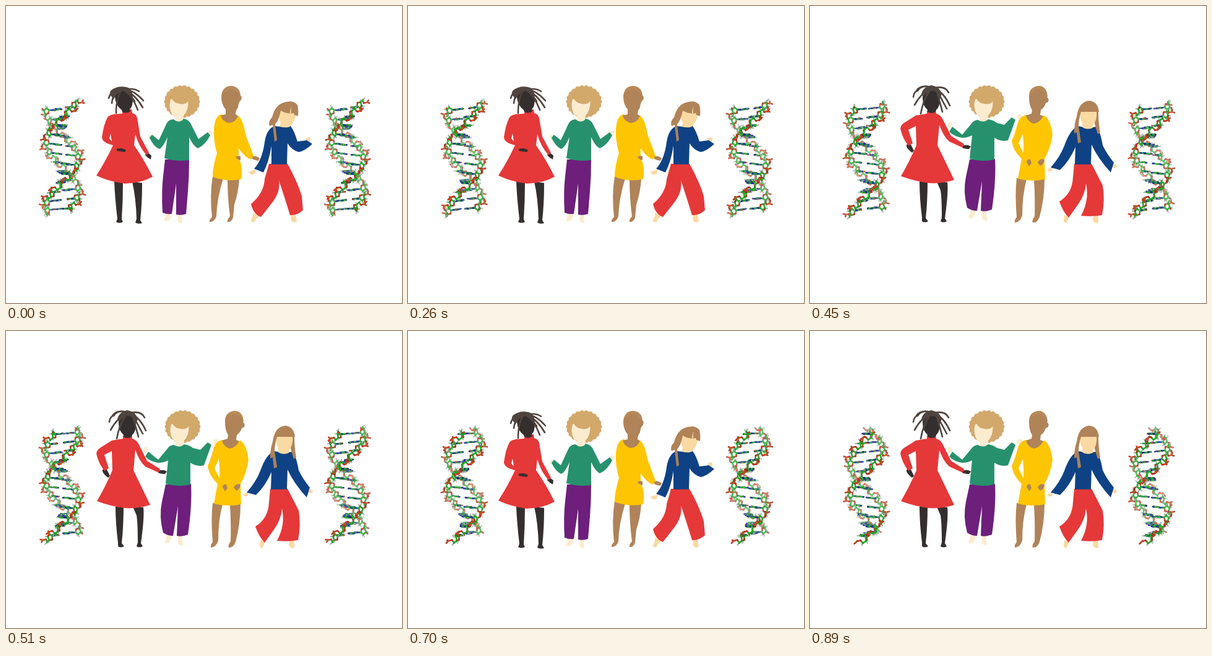
Recreate the animation shown at these times as an HTML page with a canvas. Size 640 by 480 pixels, loop 1.02 s.

```html
<!DOCTYPE html>
<html lang="en">
<head>
<meta charset="utf-8">
<title>Dancing friends</title>
<style>
html, body { margin: 0; width: 100%; height: 100%; overflow: hidden; background: #fff; }
canvas { display: block; width: 100vw; height: 100vh; }
</style>
</head>
<body>
<canvas id="stage" width="640" height="480"></canvas>
<script>
const stage = document.getElementById('stage');
const ctx = stage.getContext('2d');
const LOOP = 1020;
const STARTS = [0, 130, 260, 320, 450, 510, 640, 700, 830, 890];

/* ---- dancers: [colour, path, stroke width if it is a line] ---- */
const RED = '#e53839', GREEN = '#27916d', PURPLE = '#6d1f7b', YELLOW = '#fec503',
  NAVY = '#0f4284', DARK = '#342f2e', LOCKS = '#50443e', BROWN = '#b08358',
  CROP = '#b98a58', CURLS = '#d2a86b', CREAM = '#fbebcf', PEACH = '#fad9a2', WHITE = '#fff';

const blob = (x, y, rx, ry) =>
  `M${x - rx} ${y}a${rx} ${ry} 0 1 0 ${2 * rx} 0a${rx} ${ry} 0 1 0 ${-2 * rx} 0Z`;

function curls(x, y) {
  let d = blob(x, y, 25, 22.5);
  for (let i = 0; i < 22; i++) {
    const a = i * Math.PI / 11;
    d += blob(x + 24.5 * Math.cos(a), y + 22 * Math.sin(a), 4.4, 4.4);
  }
  return d;
}

const curlyHead = x => [
  [CURLS, curls(x + 284.5, 154.5)],
  [CREAM, `M${x + 266} 151Q${x + 263} 161 ${x + 266} 170Q${x + 268} 176 ${x + 273} 178L${x + 273} 185Q${x + 280} 189 ${x + 286} 184L${x + 287} 177Q${x + 295} 169 ${x + 294.5} 154Q${x + 289} 160 ${x + 281} 158Q${x + 272} 157 ${x + 268} 150Z`]
];

const poseA = [
  [DARK, 'M175 284L189 284Q189 315 187 345L189 349Q183 352 178 349L180 344Q176 310 175 284ZM204 284L220 286Q220 320 217 346L220 351Q213 353 209 350L211 344Q210 310 204 284Z'],
  [DARK, 'M226 238Q230 236 235 242L234 248Q228 245 225 241Z'],
  [RED, 'M188 168L203 167L204 173Q211 175 212 181L217 211L231 237L227 241Q214 226 209 207L207 225Q223 248 237 276Q216 287 192 287Q167 284 146 274Q161 251 173 225L166 223Q155 219 155 212Q158 191 164 180Q168 174 188 174Z'],
  [WHITE, 'M169 206L167 214L171 219Z'],
  [DARK, 'M179 231Q188 228 194 233L192 236Q184 235 179 234Z'],
  [DARK, 'M176 147Q176 133 191 133Q205 133 205 149Q205 163 200 167L201 170Q195 175 188 171L187 168Q177 161 176 147Z'],
  [LOCKS, 'M171 147Q165 142 170 136Q181 128 194 131Q202 132 204 142Q192 135 184 139Q177 143 174 151Z'],
  [LOCKS, 'M185 133Q171 133 166 149M187 134Q173 139 171 157M187 136Q178 147 178 173M190 135Q207 132 215 138M192 135Q207 136 222 153M191 135Q209 143 221 164M193 136Q205 147 213 168M192 137Q203 145 208 154', 2.6],

  [CREAM, 'M257 334L266 335L266 342L263 347Q257 349 255 345L258 341ZM278 335L286 335L284 343L286 350Q279 352 277 346Z'],
  [PURPLE, 'M257 248L296 248Q296 275 294 300L291 336Q283 339 275 337L275 287L268 336Q260 337 253 334Q251 300 254 275Z'],
  [CREAM, blob(233, 212, 3, 4) + blob(330, 205, 3.4, 4)],
  [GREEN, 'M270 183Q279 188 287 182Q296 184 299 191L311 215L326 204L330 209Q322 225 310 230Q303 227 296 212L296 249Q275 252 256 246L261 212Q254 228 248 231Q239 228 232 213L236 208L247 217L259 191Q262 184 270 183Z'],
  ...curlyHead(0),

  [BROWN, 'M334 275L351 279Q341 310 340 340Q337 349 329 349Q328 346 333 341Q329 306 334 275ZM358 280L377 278Q376 300 369 321L367 342Q364 350 358 349Q357 345 362 340Q358 310 358 280Z'],
  [BROWN, 'M397 244Q402 240 410 246L408 250Q400 249 397 246Z'],
  [YELLOW, 'M348 175Q362 181 375 177Q383 183 387 207L400 242L396 248Q386 245 376 230L376 245Q384 261 380 280Q357 285 334 276Q334 260 341 238Q335 217 336 200Q337 178 348 175Z'],
  [BROWN, 'M371 244Q376 241 379 243L379 249Q374 249 371 244Z'],
  [BROWN, 'M348 146Q349 130 364 130Q378 130 379 145Q382 146 380 152Q376 154 375 164Q371 169 371 175L375 178Q370 189 360 189Q350 187 347 177L355 175L355 167Q348 160 348 146Z'],
  [CROP, 'M349 144Q350 130 363 129Q376 129 378 144Q368 132 359 136Q352 137 349 144Z'],

  [PEACH, 'M399 334L410 339Q402 345 402 349Q395 350 396 346Q400 340 399 334ZM460 336L468 336L470 348Q465 352 461 347ZM404 264L402 271Q395 275 392 268ZM484 215Q490 210 492 214L491 220L485 221Z'],
  [RED, 'M425 255L455 255Q471 284 478 307L480 330Q470 339 459 338Q450 308 441 282Q444 300 430 318L412 341Q400 337 396 320Q417 302 418 280Z'],
  [NAVY, 'M434 194Q449 196 460 194Q466 202 471 219L486 217L495 223Q482 235 473 236Q462 233 455 222L454 256L429 256L429 226Q425 252 416 269L401 263Q414 249 418 220Q421 199 434 194Z'],
  [PEACH, 'M441 168L468 169Q470 183 460 194Q455 198 442 195L444 189Q439 178 441 168Z'],
  [BROWN, 'M426 194Q423 187 430 180Q435 160 449 156Q464 151 471 160Q473 168 472 178L466 176L465 173Q454 175 444 169Q441 185 435 191L438 217L434 219L431 192Z'],
  [PEACH, 'M462 162Q460 166 461 173L459 173Q459 166 462 162Z']
];

const poseB = [
  [DARK, 'M177 284L190 284Q190 315 187 343L191 348Q185 351 181 348L181 342Q177 310 177 284ZM205 284L222 285Q224 300 218 343L221 348Q215 351 211 348L213 342Q213 310 211 298Z'],
  [DARK, 'M156 224L162 222L168 234L165 237Q158 232 156 227ZM246 226Q254 223 260 227L257 231Q250 231 246 229Z'],
  [RED, 'M189 169L203 168L204 174Q211 176 214 182L228 210L249 223L247 229L225 219Q215 210 209 192L206 225Q218 250 233 281Q213 288 190 286Q169 283 147 275Q161 251 172 225L171 194L159 200L166 222L159 226Q149 213 146 198Q147 192 152 189L171 177L189 174Z'],
  [DARK, 'M182 149Q182 134 197 135Q210 136 210 150Q210 163 204 168L203 171Q197 175 190 171L190 168Q182 161 182 149Z'],
  [LOCKS, 'M180 143Q182 131 196 128Q209 130 213 142L210 150Q207 138 198 137Q189 138 183 147Z'],
  [LOCKS, 'M194 131Q180 127 174 137Q168 138 167 147M195 134Q180 140 169 160M194 136Q183 151 179 174M189 130Q177 129 172 137M202 132Q219 129 224 140M203 134Q217 141 226 161M204 135Q212 149 221 166M205 139Q209 152 214 171', 2.6],

  [CREAM, 'M259 328L268 330L266 338L264 342Q259 345 256 341L259 336ZM278 330L286 330L284 338L287 345Q282 349 278 343Z'],
  [PURPLE, 'M258 248L299 247Q301 281 294 329Q284 333 276 331L278 283L270 331Q261 331 254 326Q247 300 252 276Z'],
  [CREAM, blob(226, 192, 3.5, 5) + blob(339, 179, 4.5, 4.5)],
  [GREEN, 'M271 184Q280 189 287 183Q296 184 302 189L314 192L326 180L332 184L320 217Q309 220 298 213L298 248Q278 253 258 247L262 209Q255 213 246 213Q233 211 225 203L230 195L246 208L261 190Q264 185 271 184Z'],
  ...curlyHead(1),

  [BROWN, 'M334 278L350 280Q343 306 343 339Q339 350 331 350Q330 346 334 341Q331 304 334 278ZM362 281L379 279Q379 311 371 341Q367 351 360 350Q358 347 363 340Q364 312 362 281Z'],
  [YELLOW, 'M349 176Q368 183 379 177Q389 184 392 208Q389 230 379 247L380 280Q357 285 336 279L342 247Q328 234 326 218Q332 205 336 188Q340 178 349 176Z'],
  [WHITE, 'M344 207L337 222L345 238Q346 223 344 207Z'],
  [BROWN, 'M350 252Q351 247 356 248L358 254L354 259ZM368 253Q371 246 379 248Q378 256 372 258Z'],
  [BROWN, 'M354 147Q354 130 369 130Q384 131 383 148Q387 149 385 155L381 157Q379 164 373 168L372 176L377 178Q371 189 361 190Q352 187 349 177L358 174L359 168Q354 161 354 147Z'],
  [CROP, 'M356 144Q357 129 371 129Q384 131 384 149Q380 136 370 134Q361 135 356 144Z'],

  [PEACH, 'M411 338L419 340L415 350Q411 352 410 347ZM458 338L466 338L466 350Q461 353 457 346ZM392 260L391 266Q386 270 383 264ZM487 259Q492 253 496 258Q496 263 490 262Z'],
  [RED, 'M427 255L455 255Q465 274 473 290Q477 313 472 338Q456 341 438 339Q452 313 446 287Q445 304 433 321L418 342Q409 333 403 316Q424 303 425 277Z'],
  [NAVY, 'M433 194Q449 198 463 195Q469 202 473 225Q479 238 491 253L486 269Q465 246 455 224L454 256L428 256L429 228Q419 251 404 265L389 261Q404 244 411 226Q420 200 433 194Z'],
  [BROWN, 'M460 170L466 170Q466 188 469 204L465 207L460 190Z'],
  [PEACH, 'M437 168L463 169Q465 184 457 193L457 197Q448 201 440 196L440 189Q435 181 437 168Z'],
  [BROWN, 'M427 206Q427 190 431 179Q434 155 451 153Q465 154 467 171L438 171Q434 185 434 194L438 220L433 222L431 204Z']
];

function drawDancers(pose) {
  ctx.lineCap = 'round';
  for (const [colour, d, width] of pose) {
    const path = new Path2D(d);
    if (width) {
      ctx.strokeStyle = colour;
      ctx.lineWidth = width;
      ctx.stroke(path);
    } else {
      ctx.fillStyle = colour;
      ctx.fill(path);
    }
  }
}

/* ---- double helix: stick model, cylindrical atoms [element, r, angle, z] ---- */
const RAD = Math.PI / 180;
const SUGAR = [
  ['P', 8.9, 95.2, 2.1], ['O', 10.2, 91, 1.8], ['O', 9.3, 102, 3], ['O', 7.7, 88, 1.8],
  ['C', 7.7, 79.8, 2.8], ['C', 7.6, 69.9, 2], ['O', 6.2, 66, 1.8], ['C', 8.2, 69.9, .6],
  ['C', 7, 73.2, -.2], ['C', 5.9, 67.4, .5], ['O', 8.9, 62.5, .1],
  ['H', 8.6, 82, 3.5], ['H', 8.3, 65, 2.7], ['H', 9.1, 74, .5], ['H', 6.8, 80, -.8], ['H', 7.4, 70, -1.1]
];
const SUGAR_BONDS = '0-1 0-2 0-3 3-4 4-5 5-6 5-7 7-8 8-9 9-6 7-10 4-11 5-12 7-13 8-14 8-15';
// Flat base rings: elements, x, y, bonds.
const PURINE = {
  el: 'NCNCCNNCNC',
  x: [-1.3, 0, .9, .1, .4, 1.6, -.7, -1.9, -2.3, -1.3],
  y: [4.5, 4.9, 3.9, 2.8, 1.4, .9, .5, 1, 2.3, 3.1],
  bonds: '0-1 1-2 2-3 3-4 4-5 4-6 6-7 7-8 8-9 9-0 9-3'
};
const PYRIMIDINE = {
  el: 'NCONCNCHC',
  x: [-1.3, -1.5, -2.6, -.3, 1, 1.9, 1.1, 2.3, 0],
  y: [4.5, 3.1, 2.6, 2.4, 2.9, 2.1, 4.3, 4.9, 5.1],
  bonds: '0-1 1-2 1-3 3-4 4-5 4-6 6-7 6-8 8-0'
};
const SEQ = 'CGCGAATTCGCG';
const TILT = .1;
const INK = { C: [36, 208, 44], O: [232, 58, 36], P: [236, 116, 24], N: [32, 32, 200], H: [218, 218, 218] };
const pairs = text => text.split(' ').map(p => p.split('-').map(Number));

function nucleotide(i, side, turn) {
  const ring = 'GA'.includes(SEQ[i]) === (side > 0) ? PURINE : PYRIMIDINE;
  const flat = [...ring.el].map((el, n) =>
    [el, Math.hypot(ring.x[n], ring.y[n]), Math.atan2(ring.y[n], -ring.x[n]) / RAD, ring.y[n] * TILT]);
  const atoms = SUGAR.concat(flat).map(([el, r, angle, z]) => {
    const a = (side * angle - 34.3 * i + turn) * RAD;
    const depth = -r * Math.sin(a) * 3.65;
    const zoom = 1 + depth * .0012;
    const y = 166 + 14.7 * i - side * z * 4.35;
    return { el, depth, x: r * Math.cos(a) * 3.65 * zoom, y: 247 + (y - 247) * zoom };
  });
  const base = SUGAR.length;
  const bonds = pairs(SUGAR_BONDS).concat([[9, base]],
    pairs(ring.bonds).map(([a, b]) => [a + base, b + base]));
  return { atoms, bonds };
}

function buildBonds(turn) {
  const out = [];
  for (const side of [1, -1]) {
    const strand = [...SEQ].map((_, i) => nucleotide(i, side, turn));
    strand.forEach(({ atoms, bonds }, i) => {
      for (const [a, b] of bonds) out.push([atoms[a], atoms[b]]);
      const next = strand[i + side];
      if (next) out.push([atoms[10], next.atoms[0]]);
    });
  }
  return out.sort((p, q) => p[0].depth + p[1].depth - q[0].depth - q[1].depth);
}

function tint(el, depth, shade) {
  const fog = Math.min(1, Math.max(0, (20 - depth) / 56)) * .42;
  return `rgb(${INK[el].map(c => Math.round(c * shade * (1 - fog) + 255 * fog))})`;
}

function line(x1, y1, x2, y2, colour, width) {
  ctx.strokeStyle = colour;
  ctx.lineWidth = width;
  ctx.beginPath();
  ctx.moveTo(x1, y1);
  ctx.lineTo(x2, y2);
  ctx.stroke();
}

function drawHelix(cx, bonds) {
  ctx.save();
  ctx.translate(cx, 0);
  ctx.lineCap = 'round';
  for (const [a, b] of bonds) {
    const mx = (a.x + b.x) / 2, my = (a.y + b.y) / 2;
    const thin = a.el === 'H' || b.el === 'H' ? .75 : 1;
    for (const [shade, width] of [[.45, 2.4], [1, 1.5]]) {
      line(a.x, a.y, mx, my, tint(a.el, a.depth, shade), width * thin);
      line(mx, my, b.x, b.y, tint(b.el, b.depth, shade), width * thin);
    }
  }
  ctx.restore();
}

/* ---- playback ---- */
function draw(step) {
  ctx.fillStyle = WHITE;
  ctx.fillRect(0, 0, 640, 480);
  const bonds = buildBonds(-112 + 12 * step);
  drawHelix(91, bonds);
  drawHelix(552, bonds);
  drawDancers(Math.floor(step / 3) % 2 ? poseB : poseA);
}

const begin = performance.now();
let shown = -1;
function tick() {
  const t = (performance.now() - begin) % LOOP;
  const step = STARTS.filter(s => s <= t).length - 1;
  if (step !== shown) draw(shown = step);
  requestAnimationFrame(tick);
}
tick();
</script>
</body>
</html>
```
